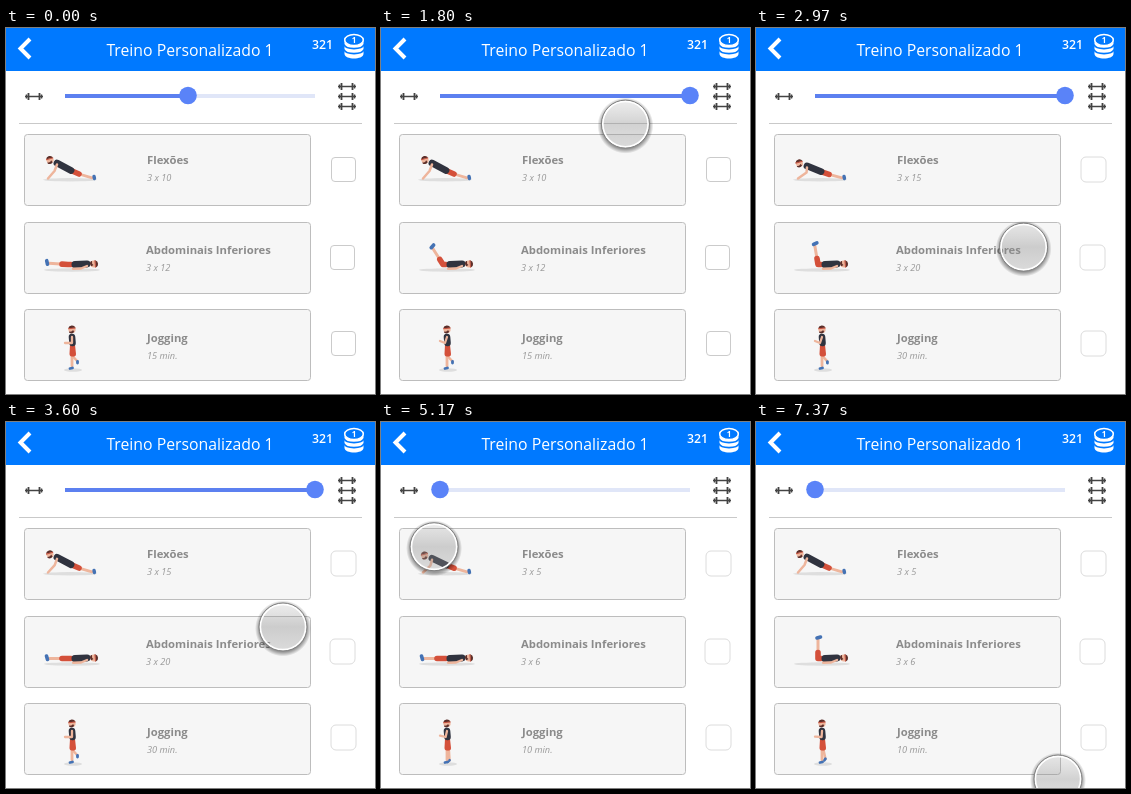
These frames come from a looping animation (369x366 px, 7450 ms). An HTML page:

```html
<!DOCTYPE html>
<html lang="pt">
<head>
<meta charset="utf-8">
<title>Treino</title>
<style>
html, body { margin: 0; width: 100%; height: 100%; overflow: hidden; background: #fff; }
svg { display: block; width: 369px; height: 366px; }
text { font-family: "Open Sans", "Noto Sans", sans-serif; }
.name { font-size: 11.3px; font-weight: 700; fill: #8b8b8b; }
.reps { font-size: 9.2px; font-style: italic; fill: #999; }
.limb { fill: none; stroke-linecap: round; stroke-linejoin: round; }
</style>
</head>
<body>
<svg viewBox="0 0 369 366" xmlns="http://www.w3.org/2000/svg">
  <defs>
    <linearGradient id="glass" x1="0" y1="0" x2="0" y2="1">
      <stop offset="0" stop-color="#999" stop-opacity=".18"/>
      <stop offset=".5" stop-color="#888" stop-opacity=".38"/>
      <stop offset="1" stop-color="#999" stop-opacity=".3"/>
    </linearGradient>
    <radialGradient id="halo">
      <stop offset=".84" stop-color="#000" stop-opacity=".38"/>
      <stop offset="1" stop-color="#000" stop-opacity="0"/>
    </radialGradient>
    <mask id="ring">
      <rect x="-40" y="-40" width="80" height="80" fill="#fff"/>
      <circle r="23.5" fill="#000"/>
    </mask>
    <g id="dumbbell" stroke="#444" fill="none">
      <path d="M-9 0H9" stroke-width="1.5"/>
      <path d="M-5.500-3.600V3.600M5.500-3.600V3.600" stroke-width="1.800"/>
      <path d="M-7.500-2.100V2.100M7.500-2.100V2.100" stroke-width="1.500"/>
    </g>
  </defs>
  <rect width="369" height="366" fill="#fff"/>
  <rect width="369" height="43" fill="#0079ff"/>
  <path d="M24 11L14.500 20.500L24 30" fill="none" stroke="#fff" stroke-width="4"/>
  <text x="184" y="28" text-anchor="middle" font-size="15.8" fill="#fff">Treino Personalizado 1</text>
  <text x="306" y="21" font-size="12.3" font-weight="600" fill="#fff">321</text>
  <g fill="none" stroke="#fff">
    <path d="M338.500 12V26C339 32 357 32 357.500 26V12Z" fill="#fff" stroke="none"/>
    <path d="M338 16.500C340 22 356 22 358 16.500M338 21.500C340 27 356 27 358 21.500" stroke="#0079ff" stroke-width="1.600"/>
    <ellipse cx="348" cy="12" rx="9.300" ry="5.500" fill="#0079ff" stroke-width="1.500"/>
  </g>
  <text x="348" y="15" text-anchor="middle" font-size="8" font-weight="700" fill="#fff">1</text>

  <use href="#dumbbell" x="28" y="68.500"/>
  <use href="#dumbbell" x="341" y="58.500"/>
  <use href="#dumbbell" x="341" y="68.500"/>
  <use href="#dumbbell" x="341" y="78.500"/>
  <g stroke-width="4">
    <path d="M59 68H309" stroke="#e0e6f8"/>
    <path id="fill" stroke="#5c80f0"/>
  </g>
  <circle id="knob" cy="67.500" r="8.800" fill="#5a83f8"/>
  <path d="M13 95.500H356" stroke="#c9c9c9"/>

  <g id="cards"></g>
  <g id="figures"></g>

  <g id="cursor">
    <circle cy="1.500" r="28" fill="url(#halo)" mask="url(#ring)"/>
    <circle r="23" fill="url(#glass)"/>
    <circle id="press" cy="2.500" r="12" fill="#f0e640" fill-opacity=".8"/>
    <circle r="22.800" fill="none" stroke="#fff" stroke-width="2"/>
    <circle r="24" fill="none" stroke="#808080" stroke-width="1"/>
  </g>
</svg>
<script>
const LOOP = 7450, FIRST = 70, STEP = 78.48;
const $ = id => document.getElementById(id);
const mix = (a, b, k) => a + (b - a) * k;
const clamp = k => Math.min(1, Math.max(0, k));
const ease = (t, from, to) => {
  const k = clamp((t - from) / (to - from));
  return k * k * (3 - 2 * k);
};
// Smooth 0 → 1 → 0 wave; phase is a fraction of the period.
const wave = (t, period, phase) => (1 - Math.cos(2 * Math.PI * (t / period + phase))) / 2;

const exercises = [
  { name: 'Flexões', x: 141, y: 106, base: 136, box: [337.5, 141.5], reps: ['3 x 10', '3 x 15', '3 x 5'] },
  { name: 'Abdominais Inferiores', x: 140, y: 194, base: 226, box: [336.5, 229.5], reps: ['3 x 12', '3 x 20', '3 x 6'] },
  { name: 'Jogging', x: 141, y: 281, base: 314, box: [337.5, 315.5], reps: ['15 min.', '30 min.', '10 min.'] }
];
$('cards').innerHTML = exercises.map(e => `
  <rect x="18.5" y="${e.y + .5}" width="286" height="71" rx="3" fill="#f6f6f6" stroke="#bdbdbd"/>
  <text class="name" x="${e.x}" y="${e.base}">${e.name}</text>
  <text class="reps" x="${e.x}" y="${e.base + 17}"></text>
  <rect class="check" fill="#fff"/>`).join('');
const reps = document.querySelectorAll('.reps');
const checks = document.querySelectorAll('.check');

const drags = [{ from: 850, to: 1450, x: 309 }, { from: 4040, to: 4757, x: 59 }];
const knobAt = t => drags.reduce((x, d) => mix(x, d.x, ease(t, d.from, d.to)), 182);

// Resting points of the pointer: leave at one time, arrive at the next.
const visits = [
  { at: 70, x: 252, y: 300 },
  { at: 800, leave: 850, x: 182, y: 78 },
  { at: 1450, leave: 1530, x: 303, y: 80 },
  { at: 2380, leave: 2450, x: 52, y: 149 },
  { at: 3130, leave: 3210, x: 301, y: 230 },
  { at: 3600, x: 277, y: 205 },
  { at: 3950, leave: 4040, x: 303, y: 75 },
  { at: 4757, x: 68, y: 77 },
  { at: 5490, x: 43, y: 157 }
];
function pointerAt(t) {
  if (t >= 6600) return [mix(306, 302, ease(t, 6600, 7060)), mix(392, 357, ease(t, 6600, 7060))];
  if (t < 70 || t > 5530) return null;
  return visits.slice(1).reduce(([x, y], v, i) => {
    const k = ease(t, visits[i].leave || visits[i].at, v.at);
    return [mix(x, v.x, k), mix(y, v.y, k)];
  }, [visits[0].x, visits[0].y]);
}

const SKIN = '#eeb59c', SHIRT = '#30333f', SHORTS = '#d4503a', HAIR = '#5b2f2a', SHOE = '#4472b4';
const limb = (color, width, ...pts) =>
  `<polyline class="limb" stroke="${color}" stroke-width="${width}" points="${pts.map(p => p.join()).join(' ')}"/>`;
const shadow = (x, y, rx) => `<ellipse cx="${x}" cy="${y}" rx="${rx}" ry="1.7" fill="#dedede"/>`;

// Head seen from the side, face to the left; turn is in degrees.
const head = (x, y, turn) => `<g transform="translate(${x} ${y}) rotate(${turn})">
  <circle r="3.600" fill="${SKIN}"/>
  <path d="M-3.600-1.500A3.800 3.800 0 0 1 3.600-1.500Z" fill="${HAIR}"/>
  <path d="M-3.200 1.800Q0 2.500 1 .5L2 2.800Q-.5 5-3 3Z" fill="${HAIR}"/>
  <path d="M-3.700-1.200H3.700" stroke="#c4513f" stroke-width="1"/></g>`;

function pushUp(t) {
  const h = clamp(1.4 * wave(t, 436, .427));
  const neck = [50, mix(144, 134.5, h)], hip = [65, mix(146, 142.5, h)];
  const thigh = [73, mix(147.5, 146, h)], ankle = [86, 149.8];
  return shadow(64, 151.8, 27) +
    limb(SKIN, 2.8, thigh, ankle) + limb(SHOE, 3.4, [88, 148.5], [88.5, 150.5]) +
    limb(SHORTS, 5.6, hip, thigh) + limb(SHIRT, 6.8, [neck[0] + 1, neck[1] + .5], hip) +
    limb(SKIN, 2.5, [51, neck[1] + 2], [mix(55, 48.5, h), mix(148, 143, h)], [42, 150.5]) +
    head(mix(42, 44, h), mix(143, 132, h), -15);
}

function legRaise(t) {
  const a = Math.PI / 2 * clamp((wave(t, 402, .2) - .32) / .66), hip = [62, 236.5];
  const along = (d, side = 0) => [hip[0] - d * Math.cos(a) + side * Math.sin(a),
                                  hip[1] - d * Math.sin(a) - side * Math.cos(a)];
  return shadow(66, 242, 28) +
    limb(SKIN, 3, hip, along(19)) + limb(SHOE, 3.6, along(20.5, -1), along(21.5, 2.5)) +
    limb(SHORTS, 5.6, [65, 236.5], hip, along(6)) +
    limb(SHIRT, 7, [81, 236], [69, 236.5]) +
    limb(SKIN, 2.4, [81, 238], [75, 240.5], [67, 240.8]) +
    head(88, 236, 85);
}

function jog(t) {
  const swing = Math.cos(Math.PI * t / 600), kick = swing ** 2;
  const knee = [mix(68, 67, kick), 328.5], foot = [mix(68, 71.5, kick), mix(339, 333.5, kick)];
  return shadow(67, 342, 9) +
    limb(SKIN, 2.6, knee, foot) + limb(SHOE, 2.8, foot, [foot[0] - mix(2, 0, kick), foot[1] + 1.5]) +
    limb(SKIN, 2.8, [66, 326], [66, 338]) + limb(SHOE, 2.8, [66.5, 340], [64, 340.5]) +
    limb(SHORTS, 5, [66.5, 317], [67.5, 326]) + limb(SHORTS, 5, [66.5, 317], [66, 326]) +
    limb(SHIRT, 6.6, [66, 309], [66.5, 315]) +
    limb(SKIN, 2.3, [66, 309], [65 + swing, 315], [59, 314 + swing]) +
    head(66, 301.5, -5);
}

function draw(t) {
  const stage = t < 2000 ? 0 : t < 5100 ? 1 : 2;
  const half = stage ? 13 : 12.5;
  exercises.forEach((e, i) => {
    reps[i].textContent = e.reps[stage];
    const look = { x: e.box[0] - half + .5, y: e.box[1] - half + .5, width: 2 * half - 1, height: 2 * half - 1,
                   rx: stage ? 5 : 3.5, stroke: stage ? '#dcdcdc' : '#cbcbcb' };
    for (const key in look) checks[i].setAttribute(key, look[key]);
  });

  const x = knobAt(t);
  $('knob').setAttribute('cx', x);
  $('fill').setAttribute('d', `M59 68H${x}`);
  $('figures').innerHTML = pushUp(t) + legRaise(t) + jog(t);

  const pointer = pointerAt(t);
  $('cursor').style.display = pointer ? '' : 'none';
  if (pointer) $('cursor').setAttribute('transform', `translate(${pointer.join(' ')})`);
  const pressed = drags.some(d => t > d.from - 60 && t < d.to);
  $('press').style.display = pressed ? '' : 'none';
}

const start = performance.now();
function tick() {
  const t = (performance.now() - start) % LOOP;
  // The small allowance absorbs the rounding of the step length.
  draw(t < FIRST ? 0 : FIRST + Math.floor((t - FIRST) / STEP + .06) * STEP);
  requestAnimationFrame(tick);
}
tick();
</script>
</body>
</html>
```
